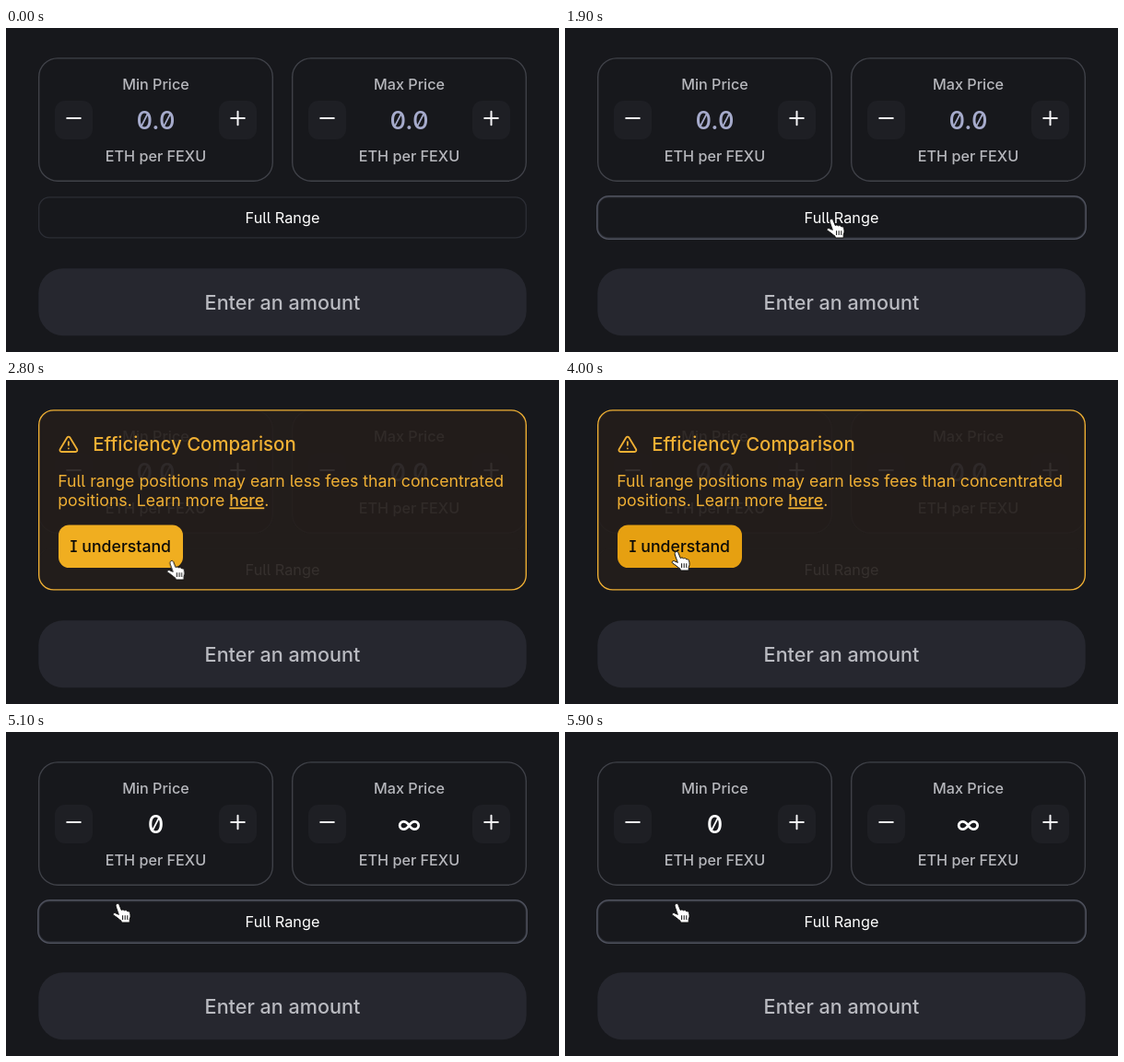
An HTML page that plays this animation: 600x352 px, repeating every 6800 ms.

```html
<!DOCTYPE html>
<html lang="en">
<head>
<meta charset="utf-8">
<title>Price range</title>
<style>
  html, body { margin: 0; width: 100%; height: 100%; overflow: hidden; background: #17181c; }
  svg { display: block; width: 100%; height: 100%; }
  text {
    font: 400 16.3px Inter, "Open Sans", sans-serif;
    font-feature-settings: "ss01", "ss02", "cv01", "cv03", "zero";
    fill: #b6b7bc;
  }
  .mid { text-anchor: middle; }
  .label { font-weight: 500; font-size: 16.2px; }
  .value { font-weight: 500; font-size: 27.2px; }
  .empty { fill: #a6abcc; }
  .set, .range { fill: #fff; }
  .submit { font-weight: 500; font-size: 21.6px; fill: #b9bac0; }
  .title { font-weight: 500; font-size: 20.4px; }
  .note { font-size: 17.7px; }
  .title, .note { fill: #f0b034; }
  .link { font-weight: 500; text-decoration: underline; }
  .confirm { font-weight: 500; font-size: 17.7px; fill: #0c0b08; }

  .card { fill: #17181c; stroke: #404249; stroke-width: 1.36; }
  .outline { fill: none; stroke: #2c2e35; stroke-width: 1.36; }
  .key { fill: #1e1f24; }
  .icon { fill: none; stroke: #f4f4f6; stroke-width: 2; stroke-linecap: round; }
  .warn { fill: none; stroke: #f0b034; stroke-width: 2; stroke-linecap: round; stroke-linejoin: round; }
  .modal { fill: rgba(243, 132, 30, .05); stroke: #f0b034; stroke-width: 1.36; }

  /* Every track shares one 6.8 s loop. */
  .form, .popup, .empty, .set, .icon, .ring, .hand, .arrow { animation: 6.8s step-end infinite; }
  .form { animation-name: dim; }
  .popup { animation-name: popup; }
  .empty { animation-name: before; }
  .set { animation-name: after; }
  .icon { animation-name: fade; }
  .ring { animation-name: hover; fill: none; stroke: #50535f; stroke-width: 1.4; }
  .hand { animation-name: hand; }
  .arrow { animation-name: arrow; }
  .pulse { fill: none; stroke: #2469e0; animation: pulse 6.8s linear infinite; }
  .button { animation: button 6.8s linear infinite; }
  .cursor { animation: move 6.8s linear infinite; }

  @keyframes dim { 0%, 73.53%, 100% { opacity: 1 } 30.88% { opacity: .09 } }
  @keyframes popup { 0%, 73.53%, 100% { opacity: 0 } 30.88% { opacity: 1 } }
  @keyframes before { 0% { opacity: 1 } 73.53%, 100% { opacity: 0 } }
  @keyframes after { 0% { opacity: 0 } 73.53%, 100% { opacity: 1 } }
  @keyframes fade { 0% { opacity: 1 } 73.53%, 100% { opacity: .75 } }
  @keyframes hover { 0%, 30.88% { opacity: 0 } 14.71%, 73.53%, 100% { opacity: 1 } }
  @keyframes hand { 0%, 33.82% { opacity: 0 } 14.71%, 40%, 100% { opacity: 1 } }
  @keyframes arrow { 0%, 33.82% { opacity: 1 } 14.71%, 40%, 100% { opacity: 0 } }
  @keyframes pulse {
    0%, 74.26%, 86.03%, 100% { stroke-width: 0 }
    82.5% { stroke-width: 5.44px }
  }
  @keyframes button {
    0%, 41.5% { fill: #f0ae20 }
    43.5%, 100% { fill: #e6a011 }
  }
  @keyframes move {
    0% { transform: translate(306px, 362px) }
    10.29% { transform: translate(306px, 362px); animation-timing-function: cubic-bezier(.3, .5, .4, 1) }
    17.65% { transform: translate(289px, 207px) }
    33.09% { transform: translate(289px, 207px); animation-timing-function: cubic-bezier(.5, 0, .75, .7) }
    41.18% { transform: translate(180px, 196px); animation-timing-function: cubic-bezier(.25, .5, .5, 1) }
    46.32%, 100% { transform: translate(121px, 186px) }
  }
</style>
</head>
<body>
<svg viewBox="0 0 600 352">
  <defs>
    <rect id="key" class="key" width="41" height="42" rx="11"/>
    <g id="field">
      <rect class="pulse" x="35" y="32.2" width="255" height="134.7" rx="21"/>
      <rect class="card" x="35.7" y="32.9" width="253.6" height="133.3" rx="20.3"/>
      <use href="#key" x="53" y="79"/>
      <use href="#key" x="231" y="79"/>
      <path class="icon" d="M66.2 98h14.6M244.2 98h14.6M251.5 90.7v14.6"/>
      <text class="label mid" x="162.5" y="145.4">ETH per FEXU</text>
    </g>
  </defs>

  <g class="form">
    <use href="#field"/>
    <use href="#field" x="275"/>
    <text class="label mid" x="162.5" y="66.6">Min Price</text>
    <text class="label mid" x="437.5" y="66.6">Max Price</text>
    <text class="value mid empty" x="162.5" y="110">0.0</text>
    <text class="value mid empty" x="437.5" y="110">0.0</text>
    <text class="value mid set" x="162.5" y="110">0</text>
    <text class="value mid set" x="437.5" y="110">∞</text>
    <rect class="outline" x="35.7" y="183.9" width="528.6" height="44" rx="11.5"/>
    <rect class="ring" x="34.8" y="182.8" width="530.4" height="46.4" rx="12.6"/>
    <text class="range mid" x="300" y="212">Full Range</text>
  </g>

  <rect x="35.3" y="261.2" width="529.4" height="73" rx="27" fill="#26272f"/>
  <text class="submit mid" x="300" y="305.8">Enter an amount</text>

  <g class="popup">
    <rect class="modal" x="35.7" y="32.9" width="528.6" height="195" rx="16"/>
    <g class="warn" transform="translate(57 59) scale(.906)">
      <path d="M10.29 3.86L1.82 18a2 2 0 0 0 1.71 3h16.94a2 2 0 0 0 1.71-3L13.71 3.86a2 2 0 0 0-3.42 0zM12 9v4M12 17h.01"/>
    </g>
    <text class="title" x="94.3" y="77.4">Efficiency Comparison</text>
    <text class="note" x="56.2" y="115.6">Full range positions may earn less fees than concentrated</text>
    <text class="note" x="56.2" y="137.4">positions. Learn more <tspan class="link">here</tspan>.</text>
    <rect class="button" x="57" y="157.5" width="135" height="46.5" rx="11.5"/>
    <text class="confirm mid" x="124.3" y="187.4">I understand</text>
  </g>

  <g class="cursor">
    <path class="arrow" d="M0 0V20L4.6 15.8L7.5 22.6L10.8 21.2L7.9 14.6H14.1Z" fill="#000" stroke="#fff" stroke-width="1.3"/>
    <g class="hand" stroke="#111" stroke-linecap="round" stroke-linejoin="round">
      <path fill="#fff" d="M-1.8 3.6C-2.6 1 .4-.9 1.7 1.2L4.3 7.6C5.2 6.5 7 6.8 7.6 8.1C8.8 7.1 10.4 7.7 10.8 9C12.2 8.3 13.4 9.2 13.6 10.6C14.3 13.5 14.2 15.5 13.2 17.4V21H4.4L4 19.2C1.5 17.5-1.5 14.5-4.2 13.2C-5.6 12.2-4.6 10-2.6 10.6L1 12.2Z"/>
      <path fill="none" d="M5.6 13.6v4M8.2 13.6v4M10.8 13.6v4"/>
    </g>
  </g>
</svg>
</body>
</html>
```
